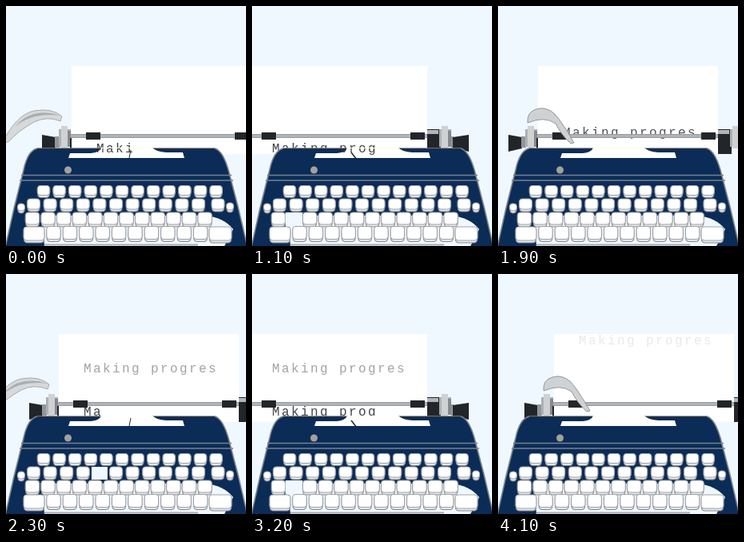
These frames come from a looping animation (300 by 300 pixels, 4200 ms). An HTML page with a canvas:

```html
<!DOCTYPE html>
<html lang="en">
<head>
<meta charset="utf-8">
<title>Typewriter</title>
<style>
html, body { margin: 0; width: 100%; height: 100%; overflow: hidden; background: #f0f8ff; }
canvas { display: block; width: 300px; height: 300px; }
</style>
</head>
<body>
<canvas id="stage" width="300" height="300"></canvas>
<script>
const ctx = document.getElementById('stage').getContext('2d');
const SKY = '#f0f8ff', NAVY = '#0b2c57', DARK = '#22252a', GREY = '#92969b';
const FRAME = 100, CYCLE = 21, TYPED = 15;
const PHRASE = 'Making progres';

// [row, column, hammer lean] for each step of a typed line
const STROKES = [
  [-1, 0, 0], [2, 9, 1], [1, 4, 0], [2, 6, -1], [1, 8, 1],
  [3, 0, 1], [0, 3, -1], [2, 8, 0], [3, 5, 1], [1, 2, -1],
  [0, 7, 0], [2, 1, -1], [3, 7, 1], [1, 5, 0], [2, 3, -1]
];

// first key centre, spacing, count, vertical centre, width, height
const ROWS = [
  [47, 19.6, 12, 232, 15.5, 15],
  [34.5, 20.6, 11, 249, 16, 16],
  [33, 19.6, 12, 267, 17.5, 18],
  [59.5, 20.4, 10, 285, 17.5, 19]
];

function rect(x, y, w, h, color) {
  ctx.fillStyle = color;
  ctx.fillRect(x, y, w, h);
}

function shape(points, fill) {
  ctx.beginPath();
  points.forEach(([x, y]) => ctx.lineTo(x, y));
  ctx.closePath();
  ctx.fillStyle = fill;
  ctx.fill();
}

function line(x1, y1, x2, y2, color, width = 1) {
  ctx.strokeStyle = color;
  ctx.lineWidth = width;
  ctx.beginPath();
  ctx.moveTo(x1, y1);
  ctx.lineTo(x2, y2);
  ctx.stroke();
}

function path(d, fill, stroke, width = 1) {
  const p = new Path2D(d);
  ctx.fillStyle = fill;
  ctx.fill(p);
  if (stroke) { ctx.strokeStyle = stroke; ctx.lineWidth = width; ctx.stroke(p); }
}

// Ink fades as a line approaches the top edge of the paper.
function typedLine(count, x, y) {
  const alpha = Math.min(0.85, Math.max(0, (y - 72) / 110));
  ctx.fillStyle = `rgba(35,35,35,${alpha})`;
  ctx.fillText(PHRASE.slice(0, count), x, y + 5);
}

function knob(x) {
  rect(x, 154, 15, 22, '#aeb1b4');
  rect(x + 3, 150, 8, 28, '#cfd1d3');
  rect(x + 11, 156, 4, 20, '#85898e');
}

function lever(pushed) {
  if (pushed) {
    path('M-13 146Q-14 132 -2 129Q10 125 21 135Q30 145 45 171L41 172Q29 161 22 147Q8 137 -13 146Z', '#cfd2d4', GREY);
  } else {
    path('M-88 174Q-70 136 -47 131Q-24 127 -12 138L-14 144Q-30 137 -47 145Q-68 157 -78 169Z', '#d6d8d9', '#a7aaad');
    path('M-70 150Q-49 126 -14 137Q-47 132 -70 150Z', '#a9adaf');
  }
}

function carriage(left, pushed) {
  ctx.save();
  ctx.translate(left, 0);
  rect(-5, 160, 232, 5, '#a1a4a7');
  rect(-5, 162, 232, 1, '#c6c8ca');
  rect(18, 158, 18, 9, DARK);
  rect(204, 158, 18, 9, DARK);

  shape([[-37, 161], [-20, 164], [-20, 178], [-37, 182]], DARK);
  rect(-21, 163, 6, 14, GREY);
  knob(-16);
  rect(-2, 165, 2, 16, DARK);

  rect(225, 154, 17, 31, DARK);
  rect(225, 155, 14, 5, '#b2b5b8');
  knob(240);
  rect(255, 163, 3, 14, GREY);
  shape([[257, 164], [277, 161], [277, 182], [257, 178]], DARK);
  lever(pushed);
  ctx.restore();
}

function key(x, y, w, h) {
  const l = x - w / 2, t = y - h / 2;
  ctx.beginPath();
  ctx.roundRect(l + 0.5, t + 2, w - 1, h - 2, 4);
  ctx.fillStyle = '#e4e6e8';
  ctx.fill();
  ctx.strokeStyle = '#868a90';
  ctx.lineWidth = 1.2;
  ctx.stroke();
  ctx.beginPath();
  ctx.roundRect(l, t, w, h - 3, 4);
  ctx.fillStyle = '#fff';
  ctx.fill();
  ctx.strokeStyle = '#a0a3a8';
  ctx.stroke();
}

function body() {
  path('M-1 302L10 253L22 205Q27 181 39 178H261Q271 181 278 205L290 251L302 302Z', NAVY, '#7d848c', 1.6);
  line(39, 178.5, 261, 178.5, '#30343a');
  path('M80 184H106Q117 183 119 177H183Q187 182 200 183H221L223 190H78Z', '#fff');
  line(19, 211.5, 282, 211.5, '#76818e', 1.6);
  line(17, 218, 284, 218, '#76818e', 1.6);
  ctx.beginPath();
  ctx.arc(77.5, 205, 4.5, 0, Math.PI * 2);
  ctx.fillStyle = '#a3a19c';
  ctx.fill();
}

function keyboard(stroke) {
  // The lower key rows sit over an open well.
  path('M46 262H248Q272 264 284 279L272 302H48Z', SKY);
  ROWS.forEach(([x, gap, count, y, w, h], row) => {
    for (let col = 0; col < count; col++) {
      const cx = x + gap * col;
      if (stroke && stroke[0] === row && stroke[1] === col) {
        rect(cx - w / 2 - 2, y - h / 2, w + 4, h, SKY);
      } else {
        key(cx, y, w, h);
      }
    }
  });
  key(265, 249, 16, 16);
  key(19, 253, 9, 12);
  key(280, 252, 9, 12);
  key(35, 286, 26, 20);
  key(268, 286, 28, 20);
  line(48, 298.5, 240, 298.5, '#a6abb1', 2);
}

function hammer(lean) {
  if (lean > 0) line(172, 178, 165, 191, DARK, 1.5);
  else if (lean < 0) line(124, 183, 131, 192, DARK, 1.5);
  else line(156, 180, 154, 190, DARK, 1);
}

function draw(frame) {
  const second = frame >= CYCLE;
  const step = frame % CYCLE;
  const typing = step < TYPED;
  const back = step - TYPED;
  const left = typing ? 82 - 8 * step : -30 + 20 * back;
  const textX = left + 31;
  const feed = 2.2 * back;
  const stroke = typing ? STROKES[step] : null;
  const count = !typing ? PHRASE.length : second ? step : 4 + Math.floor(2 * step / 3);

  rect(0, 0, 300, 300, SKY);
  rect(left, 75, 225, 110, '#fff');

  ctx.font = '16px "Liberation Mono", "Courier New", monospace';
  ctx.letterSpacing = '2.4px';
  if (second) {
    typedLine(PHRASE.length, textX, typing ? 118 : 94 - feed);
    if (back < 5) typedLine(count, textX, typing ? 172 : 149 - feed);
  } else {
    typedLine(count, textX, typing ? 178 : 167 - feed);
  }

  carriage(left, !typing);
  body();
  if (typing && !second) {
    // Fresh ink stays visible through the guide opening.
    ctx.save();
    ctx.beginPath();
    ctx.rect(112, 178, 76, 8);
    ctx.clip();
    typedLine(count, textX, 178);
    ctx.restore();
  }
  keyboard(stroke);
  if (stroke) hammer(stroke[2]);
}

function tick() {
  draw(Math.floor(performance.now() / FRAME) % (2 * CYCLE));
  requestAnimationFrame(tick);
}
tick();
</script>
</body>
</html>
```
